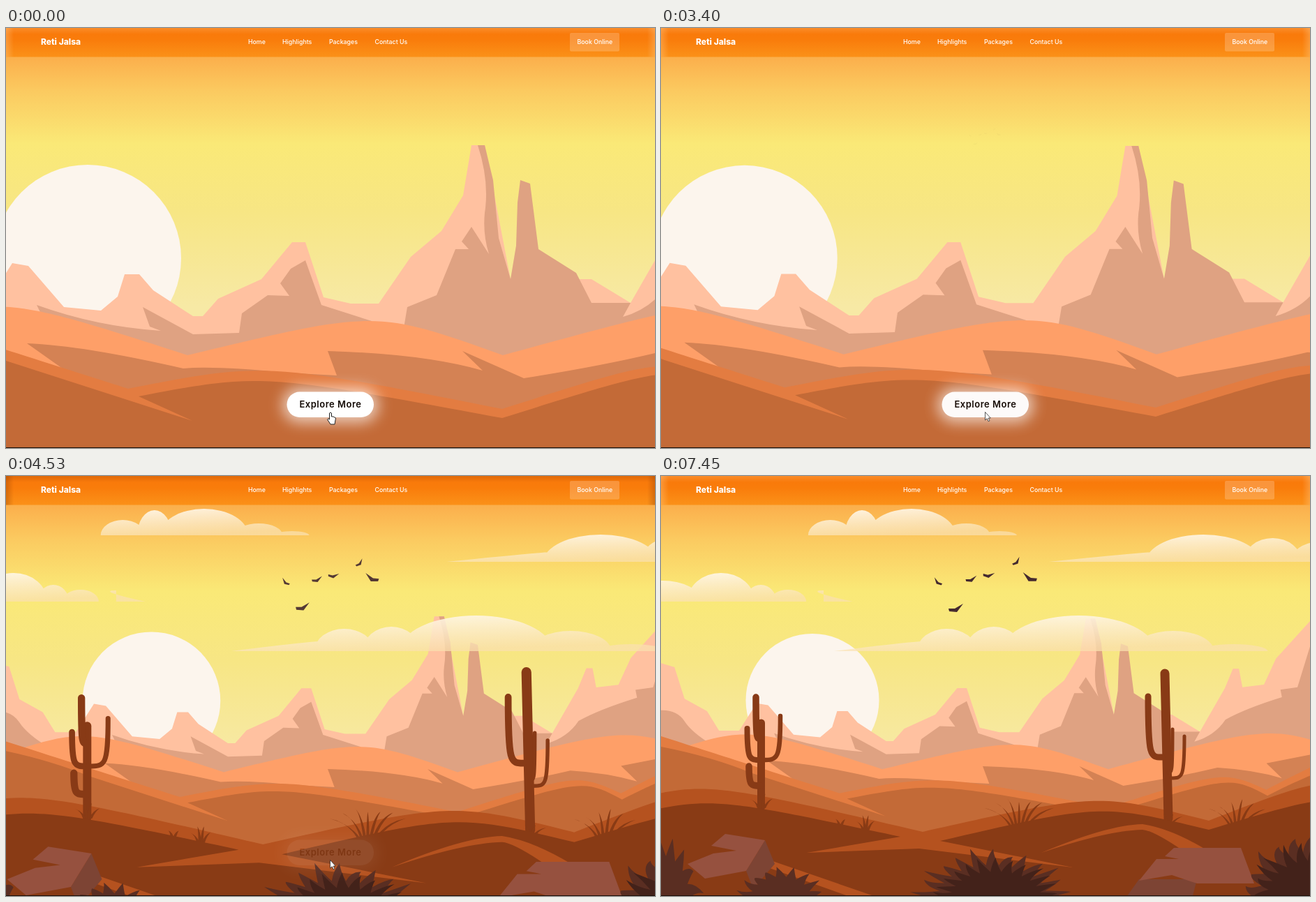
Recreate the animation shown at these times as an HTML page. Size 930 by 602 pixels, loop 8 s.

```html
<!DOCTYPE html>
<html lang="en">
<head>
<meta charset="utf-8">
<title>Desert landing page</title>
<style>
  html, body { margin: 0; height: 100%; overflow: hidden; }
  svg { display: block; width: 100vw; height: 100vh; }
  text { font-family: Inter, sans-serif; font-weight: 500; font-size: 8.8px; fill: #fff; }
  .brand { font-weight: 800; font-size: 12px; }
  .cta { font-weight: 600; font-size: 13px; letter-spacing: .5px; fill: #120904; text-anchor: middle; }
  .limb { fill: none; stroke: #883a16; stroke-linecap: round; }
</style>
</head>
<body>
<svg id="stage" viewBox="0 0 930 602" preserveAspectRatio="none">
  <defs>
    <linearGradient id="sky" gradientUnits="userSpaceOnUse" x1="0" y1="40" x2="0" y2="400">
      <stop offset="0" stop-color="#fbae4b"/><stop offset=".14" stop-color="#fbca60"/>
      <stop offset=".35" stop-color="#fae977"/><stop offset=".62" stop-color="#f7e684"/>
      <stop offset="1" stop-color="#f7e9a5"/>
    </linearGradient>
    <linearGradient id="bar" x2="0" y2="1">
      <stop offset="0" stop-color="#f9780a"/><stop offset=".4" stop-color="#f97c0b"/><stop offset="1" stop-color="#fb9118"/>
    </linearGradient>
    <linearGradient id="edge">
      <stop offset="0" stop-color="currentColor" stop-opacity=".3"/><stop offset=".012" stop-color="currentColor" stop-opacity="0"/>
      <stop offset=".988" stop-color="currentColor" stop-opacity="0"/><stop offset="1" stop-color="currentColor" stop-opacity=".3"/>
    </linearGradient>
    <linearGradient id="rim" x2="0" y2="1">
      <stop offset="0" stop-color="currentColor" stop-opacity=".2"/><stop offset="1" stop-color="currentColor" stop-opacity="0"/>
    </linearGradient>
    <linearGradient id="mist" x2=".4" y2="1">
      <stop offset="0" stop-color="#fffaf0" stop-opacity=".95"/><stop offset="1" stop-color="#fae0ae" stop-opacity=".75"/>
    </linearGradient>
    <filter id="blur" x="-50%" y="-120%" width="200%" height="340%"><feGaussianBlur stdDeviation="10"/></filter>
  </defs>

  <rect width="930" height="602" fill="url(#sky)"/>
  <circle id="sun" fill="#fcf5ed"/>
  <g id="back"></g>
  <g id="eastward" fill="url(#mist)"></g>
  <g id="westward" fill="url(#mist)"></g>
  <g id="front"></g>
  <g id="birds" fill="#452a2f"></g>

  <g id="button">
    <rect x="396" y="515" width="138" height="51" rx="25" fill="#fff" opacity=".65" filter="url(#blur)"/>
    <rect x="402.5" y="521.5" width="124.5" height="36.5" rx="18.2" fill="#fff"/>
    <text class="cta" x="465" y="544">Explore More</text>
  </g>

  <rect width="930" height="41.5" fill="url(#bar)"/>
  <rect width="930" height="41.5" fill="url(#edge)"/>
  <rect width="930" height="9" fill="url(#rim)"/>
  <rect x="808" y="7" width="71" height="26.5" rx="2" fill="#fff" opacity=".2"/>
  <text class="brand" x="50" y="24">Reti Jalsa</text>
  <text x="347" y="23">Home</text>
  <text x="396" y="23">Highlights</text>
  <text x="463" y="23">Packages</text>
  <text x="528.5" y="23">Contact Us</text>
  <text x="818.5" y="23.3">Book Online</text>
  <rect y="601" width="930" height="1" fill="#1c0f08"/>

  <circle id="click" cx="464" cy="549.5" r="11" fill="#f8f532" opacity=".75"/>
  <path id="hand" fill="#fff" stroke="#222" stroke-linejoin="round" d="M463.5 559v-7q1.5-2 3 0v5q2-1 6 2l-1.500 9h-6l-4.500-7q1-2 3 0z"/>
  <path id="arrow" fill="#fff" stroke="#222" stroke-width=".8" d="M0 0v12.500l3-2.500 2 4.500 2-1-2-4.200h3.500z"/>
</svg>

<script>
const el = id => document.getElementById(id);
const mix = (a, b, k) => a + (b - a) * k;
const clamp = v => Math.min(1, Math.max(0, v));
const add = (layer, markup) => el(layer).insertAdjacentHTML("beforeend", markup);
const shape = (layer, fill, d) => add(layer, `<path fill="${fill}" d="${d}"/>`);

let seed = 7;
const random = () => (seed = seed * 16807 % 2147483647) / 2147483647;

// Outline through alternating sharp troughs and rounded crests.
function crests([first, ...rest]) {
  let d = first.join(" "), from = first;
  for (let i = 0; i < rest.length; i += 2) {
    const [cx, cy] = rest[i], to = rest[i + 1];
    const pull = `${cx} ${(cy - (from[1] + to[1]) / 8) / .75}`;
    d += `C${pull} ${pull} ${to.join(" ")}`;
    from = to;
  }
  return d;
}

function hill(layer, fill, points, lead = "M") {
  shape(layer, fill, `${lead}${crests(points)}V760H-182Z`);
}

// Row of overlapping half ellipses on a flat base, with an optional thin wedge before it.
function cloud(layer, x, base, wedge, puffs) {
  let d = wedge ? `M${x - wedge} ${base}Q${x} ${base - 16} ${x + 30} ${base - 16}V${base}Z` : "";
  for (const [width, height] of puffs) {
    const r = Math.abs(width) * .62;
    d += `M${x + width / 2 - r} ${base}a${r} ${height} 0 0 1 ${2 * r} 0z`;
    x += width;
  }
  add(layer, `<path d="${d}"/>`);
}

// Arm that drops from its tip and bends into the trunk.
function arm(tipX, tipY, elbowY, trunkX, width) {
  add("front", `<path class="limb" stroke-width="${width}" d="M${tipX} ${tipY}C${tipX} ${elbowY} ${mix(tipX, trunkX, .15)} ${elbowY} ${trunkX} ${elbowY}"/>`);
}

// Fan of arching blades from one root.
function tuft(x, y, spread, height, count) {
  for (let i = 0; i < count; i++) {
    const u = 2 * i / (count - 1) - 1, rise = height * (1 - .35 * u * u) * mix(.75, 1, random());
    const root = x + u * spread * .25, bend = x + u * spread * .5;
    shape("front", "#893b15", `M${root - 2} ${y}Q${bend - 1} ${y - rise * .8} ${x + u * spread} ${y - rise}Q${bend + 2} ${y - rise * .7} ${root + 2} ${y}Z`);
  }
}

// Dome of pointed leaves with notches between them.
function bush(fill, cx, rx, ry, count) {
  const step = Math.PI / count;
  const at = (angle, k) => `${cx - Math.cos(angle) * rx * k} ${606 - Math.sin(angle) * ry * k}`;
  let d = "M" + at(0, .72);
  for (let i = 0; i < count; i++) {
    const a = (i + .5) * step;
    d += `Q${at(a - step * .3, .92)} ${at(a + (random() - .5) * step * .6, mix(.92, 1.12, random()))}`
       + `Q${at(a + step * .1, .88)} ${at(a + step / 2, .72)}`;
  }
  shape("front", fill, d + "Z");
}

function bird(x, y, size, angle, flip = 1) {
  add("birds", `<path transform="translate(${x} ${y}) rotate(${angle}) scale(${size * flip} ${size})" d="M-10 0h9L11-7 2 5-9 4z"/>`);
}

// Far scenery, in its opening close-up coordinates.
const light = "#ffc1a0", shaded = "#dfa282";
shape("back", light, "M-182 257L-155 265-135 328-90 353-66 392H-26L9 337 32 341 83 400 136 405 160 385 170 353H191L211 376 268 413H282L304 388 366 360 410 307H429L455 386 494 395H534L580 328 624 291 655 240 667 168H686L723 360H839L895 394 945 307 961 268H973L980 305 1023 300 1047 248 1115 173V500H-182Z");
shape("back", shaded, "M-182 351Q-150 350-135 373T-80 420L-182 440ZM44 397Q130 428 222 434L206 428 196 400 268 439 334 437 338 409 375 383 406 384 393 366 408 345 429 333 452 397 524 420 520 480H260L60 430Z");
shape("back", shaded, "M676 168H686L698 218 706 301 723 360 731 312 733 250 737 218 751 223 763 317 817 351 839 394H895L884 414Q925 402 946 370 985 348 1059 325L1056 310 1090 305 1115 224V490H560L575 400 617 383 644 317H663L653 306 667 285 692 324Q683 295 686 265 693 220 676 168Z");
hill("back", "#fe9f68", [[-182, 440], [-10, 400], [260, 469], [530, 420], [712, 469], [1040, 398], [1200, 440]]);
shape("back", "#d48254", "M85 491L30 452Q110 455 254 488 300 484 400 494L474 498 461 463Q600 467 683 491L654 463 742 502Q850 485 930 466 1000 470 1059 487L1028 457 1115 440V722H85Z");
hill("back", "#e37c41", [[-182, 403], [0, 461], [175, 517], [370, 492], [711, 546], [943, 486], [1028, 510], [1070, 488], [1115, 466]]);
hill("back", "#c36a37", [[190, 528], [365, 507], [711, 559], [955, 497], [1030, 522], [1070, 502], [1115, 482]], "M-182 424Q-80 444 0 477L267 563 ");

cloud("eastward", 217, 85, 0, [[51, 22], [40, 36], [102, 38], [55, 17], [40, 6]]);
cloud("eastward", 203, 180, -72, [[-42, 17], [-36, 24], [-78, 41], [-90, 30]]);
cloud("westward", 711, 123, 155, [[132, 39], [67, 34], [60, 28]]);
cloud("westward", 375, 251, 127, [[69, 32], [66, 35], [177, 51], [94, 29], [79, 10]]);

// Near scenery, in its settled coordinates.
const rust = "#b5521f", soil = "#893b15", brown = "#5a2e22", umber = "#43221a";
hill("front", rust, [[-60, 470], [60, 450], [375, 510], [625, 466], [785, 494], [960, 440], [1100, 470]]);
add("front", `<path class="limb" stroke-width="11" d="M143.5 354V475"/><path class="limb" stroke-width="13" d="M722 283L727 491"/>`);
arm(136, 317, 377, 143, 9.5);
arm(123.5, 362, 407, 143, 8);
arm(126, 416, 444, 143, 9.5);
arm(171, 344, 407, 145, 6.5);
arm(698, 316, 403, 718, 9);
arm(733, 363, 425, 727, 5);
arm(750, 373, 433, 731, 5);
tuft(144, 476, 16, 26, 4);
tuft(257, 500, 7, 14, 2);
tuft(293, 508, 13, 24, 4);
tuft(513, 501, 50, 42, 7);
tuft(727, 498, 21, 16, 4);
tuft(825, 500, 41, 38, 6);
hill("front", soil, [[400, 523], [630, 481], [785, 507], [960, 464], [1100, 480]],
  `M${crests([[-60, 490], [70, 470], [343, 517]])}L209 540 370 534 590 561 `);
shape("front", rust, "M160 552L305 602H268L150 560ZM545 540Q640 500 690 499 730 505 780 535H745Q705 508 690 507 640 508 545 540Z");
shape("front", "#7d4434", "M149 522L163 556 132 592 122 566ZM685 578L768 578 762 602H668Z");
shape("front", "#96513f", "M92 513L149 522 122 566 63 577 38 556 75 541 108 537 72 530ZM735 533H831L850 584H768L732 572 685 580 710 549H742L722 545Z");
bush(brown, 475, 108, 67, 13);
bush(umber, 480, 90, 54, 13);
bush(brown, 0, 56, 86, 9);
bush(brown, 172, 60, 44, 9);
bush(brown, 930, 100, 92, 11);
bush(umber, 935, 92, 76, 13);

bird(422, 190, 1, 0);
bird(397, 152, .65, 20, -1);
bird(444, 148, .75, 0);
bird(469, 142, .75, 15);
bird(509, 123, .65, -25);
bird(529, 146, 1, 5, -1);

// cubic-bezier(.97, 0, 0, 1)
function ease(u) {
  let lo = 0, hi = 1;
  for (let i = 0; i < 24; i++) {
    const s = (lo + hi) / 2;
    if (3 * (1 - s) ** 2 * s * .97 + s ** 3 < u) lo = s; else hi = s;
  }
  return lo * lo * (3 - 2 * lo);
}

function place(id, x, y = 0, scale = 1) {
  el(id).setAttribute("transform", `translate(${x} ${y}) scale(${scale})`);
}
const show = (id, visible) => el(id).style.display = visible ? "" : "none";

function draw(t) {
  const p = ease(clamp((t - 2720) / 2880)), q = 1 - p;

  el("sun").setAttribute("cx", mix(117, 217, p));
  el("sun").setAttribute("cy", mix(330, 321.5, p));
  el("sun").setAttribute("r", mix(134, 95.5, p));
  place("back", 130.5 * p, 84 * p, mix(1, .717, p));
  place("front", -466 * q, -314 * q, 1 + 1.03 * q);
  place("birds", 329 * q, 110 * q, mix(.29, 1, p));
  place("eastward", -880 * q);
  place("westward", 880 * q);
  el("birds").setAttribute("opacity", p);
  el("button").setAttribute("opacity", q);
  el("stage").style.color = t >= 3520 && t < 5610 ? "#7a3000" : "#ffd9a0";

  const clicked = t >= 2660, leave = clamp((t - 6400) / 1050);
  show("click", t >= 2460 && !clicked);
  show("hand", !clicked);
  show("arrow", clicked && leave < 1);
  place("arrow", 464.5 + 3 * leave, 550.5 + 51 * leave, .92);
}

const start = performance.now();
function tick(now) {
  draw(Math.max(0, now - start) % 8000);
  requestAnimationFrame(tick);
}
draw(0);
requestAnimationFrame(tick);
</script>
</body>
</html>
```
